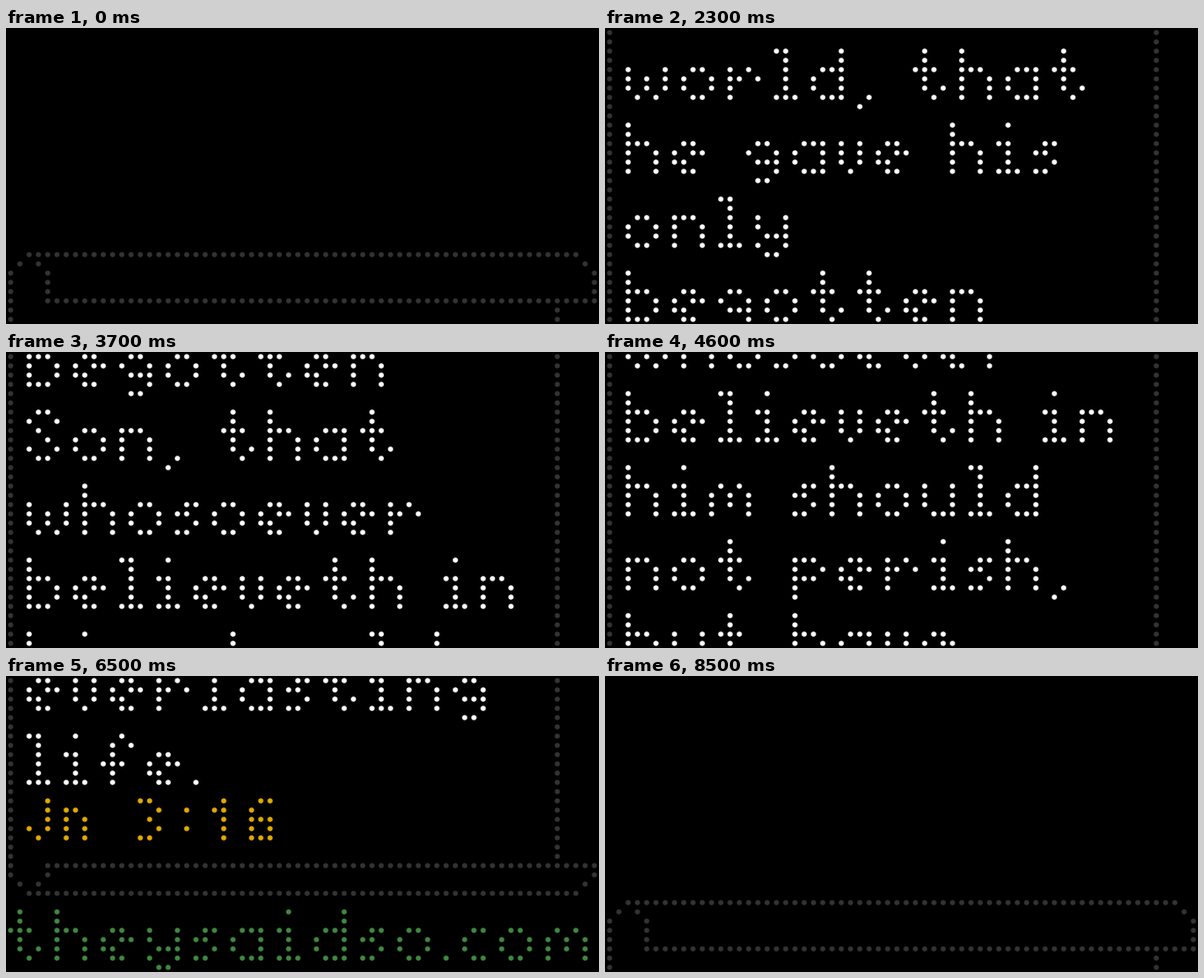
An HTML page that plays this animation: 640 px wide and 320 px high, repeating every 8.55 s.

```html
<!DOCTYPE html>
<html lang="en">
<head>
<meta charset="utf-8">
<title>LED verse</title>
<style>
  html, body { margin: 0; width: 100%; height: 100%; overflow: hidden; background: #000; }
  svg { display: block; width: 640px; height: 320px; }
</style>
</head>
<body>
<svg viewBox="0 0 640 320" role="img" aria-label="Scrolling LED verse"><g id="page"></g></svg>
<script>
const PITCH = 10, RADIUS = 2.75, STEP = 50, STEPS = 171, REENTRY = 163;
const GRAY = '#333', WHITE = '#fff', GOLD = '#e0aa00', GREEN = '#408840';

// Rows run from the top of a glyph, divided by slashes.
const LARGE = {
  F: '####/#/###/#/#/#',
  G: '.##/#..#/#/#.##/#..#/.##',
  S: '.##/#..#/.#/..#/#..#/.##',
  a: '//.###/#..#/#..#/.###',
  b: '#/#/###/#..#/#..#/###',
  c: '//.##/#/#/.##',
  d: '...#/...#/.###/#..#/#..#/.###',
  e: '//.##/#.##/##/.##',
  f: '..#/.#.#/.#/###/.#/.#',
  g: '//.##/#..#/.###/...#/.##',
  h: '#/#/###/#..#/#..#/#..#',
  i: '.#//##/.#/.#/###',
  l: '##/.#/.#/.#/.#/###',
  m: '//.#.#/#.#.#/#.#.#/#...#',
  n: '//###/#..#/#..#/#..#',
  o: '//.##/#..#/#..#/.##',
  p: '//###/#..#/###/#/#',
  r: '//#.#/##.#/#/#',
  s: '//.##/##/..#/##',
  t: '.#/.#/###/.#/.#.#/..#',
  u: '//#..#/#..#/#..#/.###',
  v: '//#.#/#.#/#.#/.#',
  w: '//#...#/#.#.#/#.#.#/.#.#',
  y: '//#..#/#..#/.###/#..#/.##',
  ',': '/////.#/#',
  '.': '/////#',
  ' ': '..'
};
const SMALL = {
  J: '..#/..#/..#/#.#/.#',
  n: '/##/#.#/#.#/#.#',
  1: '.#/##/.#/.#/.#',
  3: '##/..#/.#/..#/##',
  6: '.##/#/###/#.#/###',
  ':': '/.#//.#',
  ' ': ''
};
const VERSE = ['For God so', 'loved the', 'world, that', 'he gave his', 'only', 'begotten',
  'Son, that', 'whosoever', 'believeth in', 'him should', 'not perish,', 'but have',
  'everlasting', 'life.'];

const page = document.getElementById('page');

function dot(col, row, color) {
  const circle = document.createElementNS('http://www.w3.org/2000/svg', 'circle');
  circle.setAttribute('cx', (col + 0.5) * PITCH);
  circle.setAttribute('cy', (row + 0.5) * PITCH);
  circle.setAttribute('r', RADIUS);
  circle.setAttribute('fill', color);
  page.append(circle);
}

function hline(from, to, row) {
  for (let col = from; col <= to; col++) dot(col, row, GRAY);
}

function vline(col, from, to) {
  for (let row = from; row <= to; row++) dot(col, row, GRAY);
}

function write(text, col, top, color, font, advance) {
  for (const letter of text) {
    const rows = font[letter].split('/');
    rows.forEach((bits, y) => [...bits].forEach((bit, x) => {
      if (bit === '#') dot(col + x, top + y, color);
    }));
    col += advance || Math.max(...rows.map(bits => bits.length)) + 1;
  }
}

function drawBook() {
  hline(2, 61, 24);
  for (const col of [1, 3, 62]) {
    dot(col, 25, GRAY);
    dot(col, 152, GRAY);
  }
  vline(0, 26, 151);
  vline(4, 26, 28);
  vline(63, 26, 28);
  hline(4, 63, 29);
  vline(59, 30, 149);
  hline(4, 63, 150);
  dot(4, 151, GRAY);
  dot(63, 151, GRAY);
  hline(2, 61, 153);
}

drawBook();
VERSE.forEach((line, i) => write(line, 2, 32 + 8 * i, WHITE, LARGE));
write('Jn 3:16', 2, 143, GOLD, SMALL, 4);
write('theysaidso.com', 0, 155, GREEN, LARGE);

function render(time) {
  const step = Math.floor(time / STEP) % STEPS;
  const shift = step < REENTRY ? -step : STEPS - 1 - step;
  page.setAttribute('transform', `translate(0 ${shift * PITCH})`);
}

const start = performance.now();
function tick() {
  render(performance.now() - start);
  requestAnimationFrame(tick);
}
tick();
</script>
</body>
</html>
```
